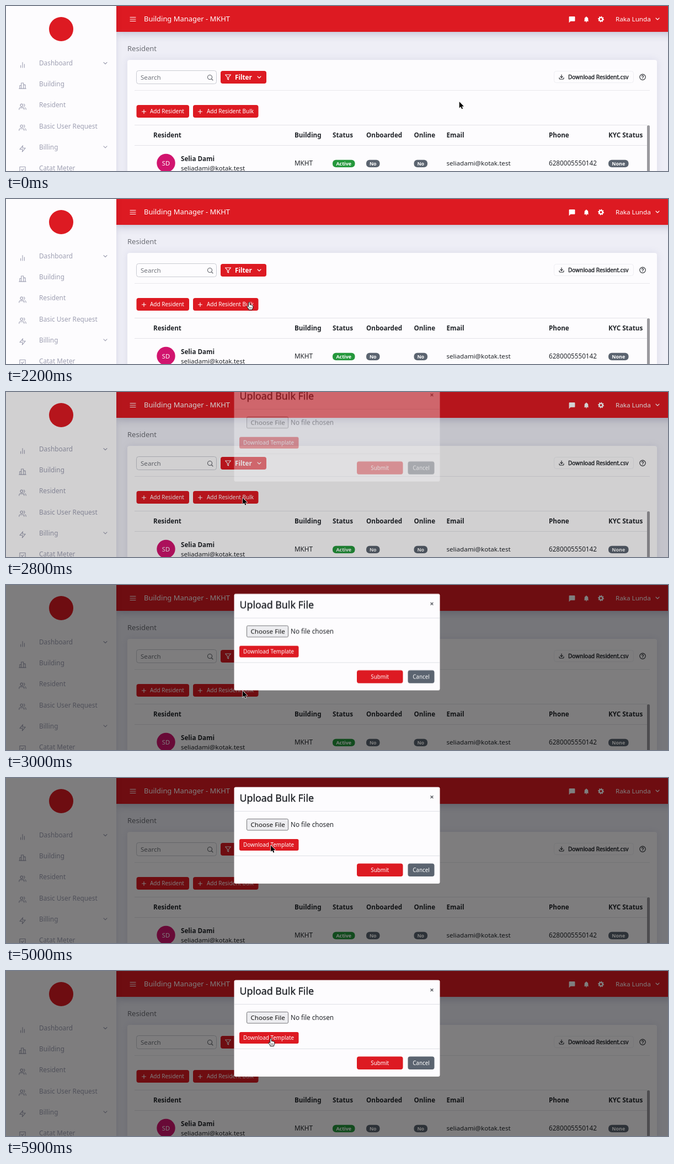
Animation, 1200 px wide and 300 px high, one loop 6 s. Source, as an HTML page with a canvas:

```html
<!DOCTYPE html>
<html lang="en">
<head>
<meta charset="utf-8">
<title>Resident</title>
<style>
html, body { margin: 0; width: 100%; height: 100%; overflow: hidden; background: #eeeef6; }
canvas { display: block; width: 1200px; height: 300px; }
</style>
</head>
<body>
<canvas id="stage" width="1200" height="300"></canvas>
<script>
const LOOP = 6000;
const RED = '#dd1a22', PAPER = '#fdfcfe', INK = '#212429', MUTED = '#9fa0b3', SLATE = '#5b6470';
const stage = document.getElementById('stage').getContext('2d');

const ICON = {
  bars: 'M18 21V10M12 21V4M6 21v-7',
  building: 'M3 21V11h5M8 21V3h7v18M15 9h6v12M1 21h22',
  users: 'M17 21v-2a4 4 0 0 0-4-4H5a4 4 0 0 0-4 4v2M9 3a4 4 0 1 1 0 8a4 4 0 1 1 0-8M23 21v-2a4 4 0 0 0-3-3.87M16 3.13a4 4 0 0 1 0 7.75',
  zap: 'M13 2 3 14h9l-1 8 10-12h-9z',
  check: 'M3 3h18v18H3zM8 11l3 4 5-6',
  filter: 'M22 3H2l8 9.46V19l4 2v-8.54z',
  download: 'M21 15v4a2 2 0 0 1-2 2H5a2 2 0 0 1-2-2v-4M7 10l5 5 5-5M12 15V3',
  search: 'M11 3a8 8 0 1 1 0 16a8 8 0 1 1 0-16M17 17l5 5',
  help: 'M12 2a10 10 0 1 1 0 20a10 10 0 1 1 0-20M9 9a3 3 0 0 1 6 1c0 2-3 2.4-3 4M12 17v.4',
  plus: 'M12 5v14M5 12h14',
  chevron: 'M6 9l6 6 6-6',
  menu: 'M2 5h20M2 12h20M2 19h20',
  chat: 'M4 2h16a2 2 0 0 1 2 2v12a2 2 0 0 1-2 2H7l-5 5V4a2 2 0 0 1 2-2z',
  bell: 'M12 1a2 2 0 0 1 2 2c4 1 5 4 5 8v5l2 3H3l2-3v-5c0-4 1-7 5-8a2 2 0 0 1 2-2zM9.5 20h5a2.5 2.5 0 0 1-5 0z'
};
const ARROW = new Path2D('M0 0V12.6L2.9 9.9L4.9 14.4L6.9 13.5L5 9.2H9z');
const HAND = new Path2D('M-1.3 .9Q0 -.7 1.2 .9V5Q2.4 4.2 3.3 5.4Q4.6 4.8 5.2 6Q6.6 5.6 6.8 7.3V10Q6.6 11.6 5.6 12.6V14H-1.2V12.8L-3.9 8.8Q-4.4 7 -2.7 7.2L-1.3 8.6z');

const clamp = v => Math.max(0, Math.min(1, v));
const ramp = (t, a, b) => clamp((t - a) / (b - a));
const smooth = p => p * p * (3 - 2 * p);

function text(c, str, x, y, size = 11.7, color = INK, weight = 400, align = 'left') {
  c.font = `${weight} ${size}px "Noto Sans", "Open Sans", sans-serif`;
  c.fillStyle = color;
  c.textAlign = align;
  c.fillText(str, x, y + size * .357);
}

// Medium weight: regular letters with a hairline outline
function mediumText(c, str, x, y, size) {
  text(c, str, x, y, size);
  c.strokeStyle = INK;
  c.lineWidth = .4;
  c.strokeText(str, x, y + size * .357);
}

function box(c, x, y, w, h, r, fill, stroke) {
  c.beginPath();
  c.roundRect(x, y, w, h, r);
  if (fill) { c.fillStyle = fill; c.fill(); }
  if (stroke) { c.strokeStyle = stroke; c.lineWidth = 1; c.stroke(); }
}

function rule(c, x, y, w, color) {
  c.fillStyle = color;
  c.fillRect(x, y, w, 1);
}

function disc(c, x, y, r, color) {
  c.beginPath();
  c.arc(x, y, r, 0, Math.PI * 2);
  c.fillStyle = color;
  c.fill();
}

function icon(c, name, x, y, size, color, fill = false, weight = 1.1) {
  const k = size / 24, path = new Path2D(ICON[name]);
  c.save();
  c.translate(x - size / 2, y - size / 2);
  c.scale(k, k);
  c.lineCap = c.lineJoin = 'round';
  c.lineWidth = weight / k;
  c.strokeStyle = c.fillStyle = color;
  fill ? c.fill(path) : c.stroke(path);
  c.restore();
}

function gear(c, x, y) {
  c.beginPath();
  for (let i = 0; i < 32; i++) {
    const a = (i + .5) * Math.PI / 16, r = i % 4 < 2 ? 5.6 : 4.2;
    c.lineTo(x + r * Math.cos(a), y + r * Math.sin(a));
  }
  c.closePath();
  c.fillStyle = '#fff';
  c.fill();
  disc(c, x, y, 1.9, RED);
}

function badge(c, str, x, w, color) {
  box(c, x, 279.7, w, 13.6, 6, color);
  text(c, str, x + w / 2, 286.5, 8.9, '#fff', 700, 'center');
}

function shaded(c, color, blur, dy, draw) {
  c.save();
  c.shadowColor = color;
  c.shadowBlur = blur;
  c.shadowOffsetY = dy;
  draw();
  c.restore();
}

function sidebar(c) {
  shaded(c, 'rgba(60,60,110,.12)', 10, 0, () => box(c, 0, -10, 200, 320, 0, PAPER));
  disc(c, 100, 42, 22, RED);
  const items = [['Dashboard', 'bars'], ['Building', 'building'], ['Resident', 'users'],
    ['Basic User Request', 'users'], ['Billing', 'zap'], ['Catat Meter', 'check']];
  items.forEach(([label, glyph], i) => {
    const y = 104 + i * 38.1;
    icon(c, glyph, 30, y + 3, 13.5, MUTED);
    text(c, label, 60, y, 11.8, MUTED);
    if (label === 'Dashboard' || label === 'Billing') icon(c, 'chevron', 180, y, 12, MUTED);
  });
}

function header(c) {
  shaded(c, 'rgba(70,70,120,.3)', 14, 3, () => box(c, 200, -20, 1020, 67, 0, RED));
  icon(c, 'menu', 230, 24, 12, '#fff', false, 1);
  text(c, 'Building Manager - MKHT', 250, 23.5, 12.95, '#fff');
  icon(c, 'chat', 1026, 24.5, 13, '#fff', true);
  icon(c, 'bell', 1052, 24.5, 11.5, '#fff', true);
  gear(c, 1078.5, 24);
  text(c, 'Raka Lunda', 1105, 23.5, 11.65, '#fff');
  icon(c, 'chevron', 1181, 23.5, 12, '#fff');
}

function card(c) {
  shaded(c, 'rgba(90,90,150,.13)', 14, 0, () => box(c, 220, 98, 960, 230, 4, PAPER));
  box(c, 236.5, 117.5, 145, 24, 4, PAPER, '#c9cbd2');
  text(c, 'Search', 244, 129.5, 11.6, '#70737a');
  icon(c, 'search', 370, 130, 12, '#5d6067');
  box(c, 389, 118, 83, 23, 4, RED);
  icon(c, 'filter', 402.5, 129.5, 12, '#fff');
  text(c, 'Filter', 415, 129.5, 11.7, '#fff', 700);
  icon(c, 'chevron', 459, 129.5, 12, '#fff');
  box(c, 993.5, 118.5, 144, 21, 4, PAPER, '#eeeef2');
  icon(c, 'download', 1007, 129, 10.5, INK);
  mediumText(c, 'Download Resident.csv', 1019, 129.3, 10.1);
  icon(c, 'help', 1154, 129.3, 12.5, INK);
  rule(c, 233, 153, 934, '#e8e7ec');

  box(c, 236.5, 180, 95.5, 23, 4, RED);
  icon(c, 'plus', 250, 192, 12, '#fff');
  text(c, 'Add Resident', 261, 191.5, 9.98, '#fff');
  box(c, 339, 180, 118.5, 23, 4, RED);
  icon(c, 'plus', 352, 192, 12, '#fff');
  text(c, 'Add Resident Bulk', 364, 191.5, 9.98, '#fff');
}

function table(c) {
  rule(c, 233, 216, 929, '#e3e3e8');
  rule(c, 233, 253, 929, '#e3e3e8');
  const heads = [['Resident', 267], ['Building', 523], ['Status', 592], ['Onboarded', 653],
    ['Online', 739.5], ['Email', 798.5], ['Phone', 984], ['KYC Status', 1092]];
  for (const [label, x] of heads) text(c, label, x, 235, 11.65, INK, 700);
  box(c, 1162, 217, 5, 90, 2, '#9b9a9f');

  disc(c, 290, 285.5, 16.7, '#d1146e');
  text(c, 'SD', 290, 286, 11.2, '#fff', 400, 'center');
  text(c, 'Selia Dami', 317, 278, 11.65, INK, 700);
  text(c, 'seliadami@kotak.test', 317, 294.5, 11.6);
  text(c, 'MKHT', 523, 286);
  badge(c, 'Active', 592, 40.5, '#25983c');
  badge(c, 'No', 653, 24.5, SLATE);
  badge(c, 'No', 739.5, 24.5, SLATE);
  text(c, 'seliadami@kotak.test', 798.5, 286, 11.6);
  text(c, '6280005550142', 984, 286);
  badge(c, 'None', 1092, 36.5, SLATE);
}

function page(c) {
  c.fillStyle = '#eeeef6';
  c.fillRect(0, 0, 1200, 300);
  text(c, 'Resident', 220, 77, 13, '#6d6f76');
  card(c);
  table(c);
  header(c);
  sidebar(c);
}

function modal(c, full) {
  box(c, 413.5, 16.5, 373, full ? 175.5 : 78.5, 3, PAPER);
  mediumText(c, 'Upload Bulk File', 423.5, 36.5, 17.8);
  text(c, '×', 772, 34, 13, '#55585e', 700, 'center');
  rule(c, 414, 60, 372, '#dfe1e6');
  rule(c, 414, full ? 141 : 80, 372, '#dfe1e6');
  if (!full) return;
  box(c, 436.5, 74.5, 75, 20.5, 2, '#ededf0', '#76767a');
  text(c, 'Choose File', 443.5, 85, 11.6, '#111');
  text(c, 'No file chosen', 516, 85, 11.7);
  box(c, 423, 111, 107.5, 21, 3, RED);
  text(c, 'Download Template', 430, 121.7, 9.85, '#fff');
  box(c, 636, 155.5, 83.5, 23.5, 4, RED);
  text(c, 'Submit', 677.7, 167.3, 9.9, '#fff', 400, 'center');
  box(c, 728.5, 155.5, 48, 23.5, 4, SLATE);
  text(c, 'Cancel', 752.5, 167.3, 9.9, '#fff', 400, 'center');
}

function layer(draw) {
  const el = document.createElement('canvas');
  el.width = 1200;
  el.height = 300;
  draw(el.getContext('2d'));
  return el;
}

function veil(c, color, alpha) {
  c.globalAlpha = alpha;
  c.fillStyle = color;
  c.fillRect(0, 0, 1200, 300);
  c.globalAlpha = 1;
}

// Each stop: start, end, x, y
const MOVES = [[200, 1950, 441, 187.5], [2350, 2600, 429, 192.5], [3100, 3850, 465.7, 155], [4150, 4850, 480, 122.5]];

function pointer(t) {
  let x = 821.7, y = 174;
  for (const [a, b, tx, ty] of MOVES) {
    const p = smooth(ramp(t, a, b));
    x += (tx - x) * p;
    y += (ty - y) * p;
  }
  return [x, y];
}

function cursor(c, t) {
  const [x, y] = pointer(t);
  const inside = (l, r, top, bottom) => x > l && x < r && y > top && y < bottom;
  const overAdd = t < 2720 && (inside(339, 457, 180, 203) || inside(237, 332, 180, 203));
  const overTemplate = (t > 3000 && t < 4950 || t >= 5600) && inside(423, 531, 111, 132);
  const hand = overAdd || overTemplate;
  c.save();
  c.translate(x, y);
  c.lineJoin = 'round';
  if (hand) {
    c.fillStyle = '#fff';
    c.fill(HAND);
    c.strokeStyle = '#111';
    c.lineWidth = 1;
    c.stroke(HAND);
    c.beginPath();
    for (const fx of [0, 2, 4]) { c.moveTo(fx, 9); c.lineTo(fx, 12); }
    c.lineWidth = .7;
    c.stroke();
  } else {
    c.scale(.92, .92);
    c.strokeStyle = '#fff';
    c.lineWidth = 1.4;
    c.stroke(ARROW);
    c.fillStyle = '#000';
    c.fill(ARROW);
  }
  c.restore();
}

const base = layer(page);
const fullModal = layer(c => modal(c, true));
const shortModal = layer(c => modal(c, false));

function render(t) {
  const c = stage;
  c.drawImage(base, 0, 0);
  if (t > 2720) {
    veil(c, '#000', .5 * ramp(t, 2730, 2930));
    const busy = t >= 5150 && t < 5550;
    const lift = -50 * Math.pow(1 - ramp(t, 2720, 3020), 1.7);
    c.globalAlpha = ramp(t, 2720, 2950);
    c.drawImage(busy ? shortModal : fullModal, 0, lift);
    c.globalAlpha = 1;
  }
  const wait = Math.min(ramp(t, 5100, 5200), 1 - ramp(t, 5500, 5600));
  if (wait > 0) {
    veil(c, '#fff', .7 * wait);
    c.globalAlpha = wait;
    disc(c, 591, 264.5, 13, RED);
    text(c, 'please wait...', 597, 290, 11.6, '#111', 400, 'center');
    c.globalAlpha = 1;
  }
  cursor(c, t);
}

const start = performance.now();
function tick(now) {
  render(Math.max(0, now - start) % LOOP);
  requestAnimationFrame(tick);
}
tick(start);
</script>
</body>
</html>
```
